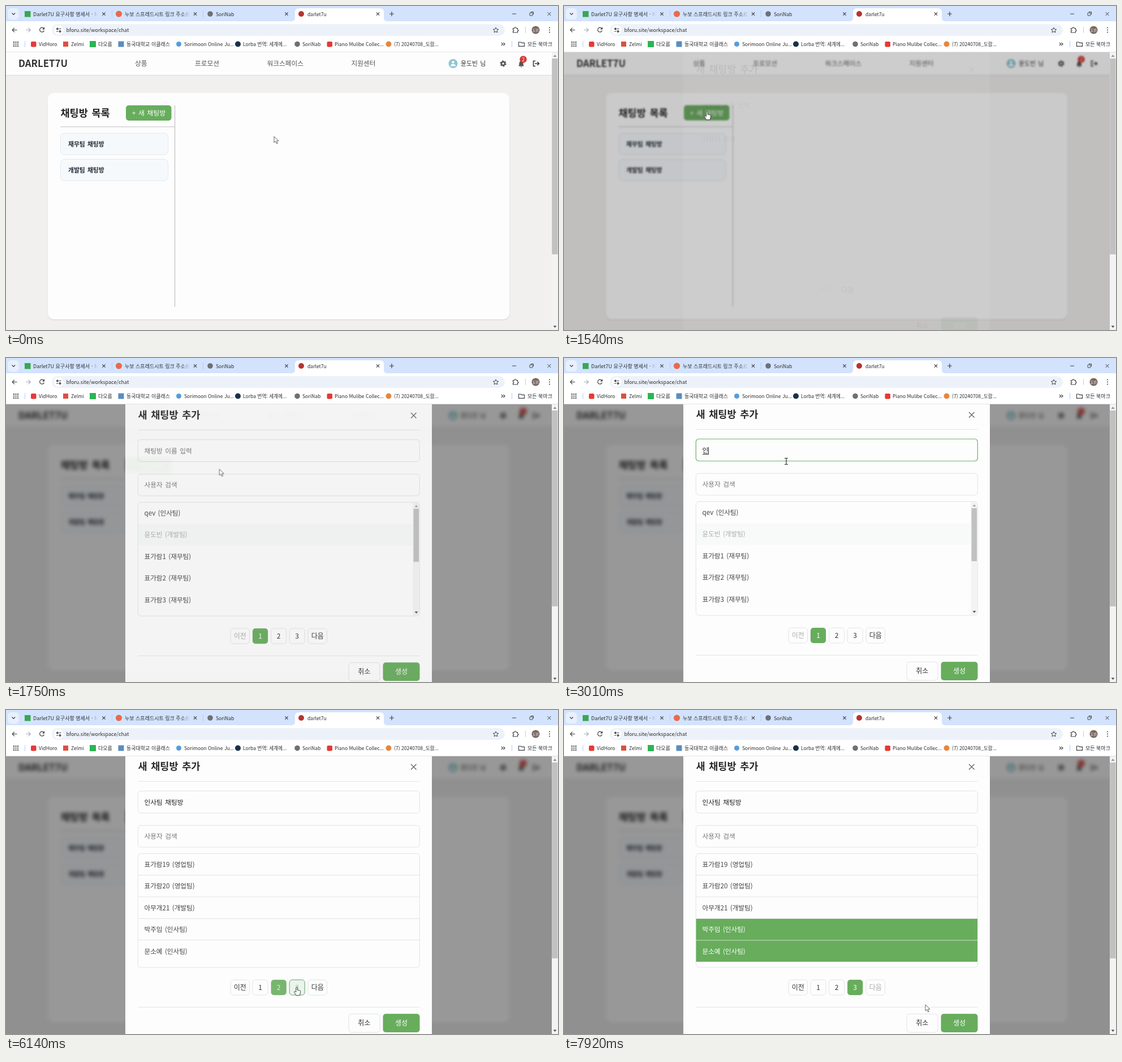
Animation of 976x574 px, one loop 8 s. Source, as an HTML page:

```html
<!DOCTYPE html>
<html lang="ko">
<head>
<meta charset="utf-8">
<title>새 채팅방 추가</title>
<style>
html, body { margin: 0; width: 100%; height: 100%; overflow: hidden; background: #fff; }
svg { display: block; }
text, p { font-family: "Noto Sans CJK KR", "Noto Sans CJK", "Noto Sans", sans-serif; word-spacing: .1em; }
.ui { font-size: 8.6px; fill: #2b2c2f; word-spacing: 0; }
.ui text { word-spacing: 0; }
.ko { font-size: 9px; }
.nav { font-size: 11.7px; fill: #555; }
.user { font-size: 10.9px; fill: #333; }
.b { font-weight: 700; }
.mid { text-anchor: middle; }
.line { fill: none; stroke: #3c4043; stroke-width: 1.2; }
.thin { stroke-width: 1; }
.box { fill: #fdfdfd; stroke: #e1e4e4; }
.green { fill: #67ad5c; }
.w { fill: #fff; }
.hint { fill: #767676; font-size: 11.7px; }
.row text { font-size: 11.6px; fill: #444; }
.row path { stroke: #e1e4e4; }
.row .off, .btn .off { fill: #aaa; }
.btn text { font-size: 12px; fill: #333; text-anchor: middle; }
.btn .w, .sel text { fill: #fff; }
.btn .over { fill: #8fc18a; }

/* one 8 s timeline shared by every moving part */
.t { animation: 8s linear infinite both; }
.blur { animation-name: blur; }
.dim { animation-name: dim; }
.modal { animation-name: modal; }
.hov { animation-name: hov; }
.lift { animation-name: lift; }
.focus { animation-name: focus; }
.empty { animation-name: empty; }
.loaded { animation-name: loaded; }
.l1 { animation-name: l1; } .l2 { animation-name: l2; } .l3 { animation-name: l3; }
.a1 { animation-name: a1; } .a2 { animation-name: a2; } .a3 { animation-name: a3; }
.tint { animation-name: tint; }
.s4 { animation-name: s4; } .s5 { animation-name: s5; }
.cursor { animation-name: path; }
.arrow { animation-name: arrow; } .hand { animation-name: hand; } .beam { animation-name: beam; }

@keyframes blur { 0%, 18.5% { filter: blur(0); } 20%, 100% { filter: blur(3px); } }
@keyframes dim { 0%, 18.5% { opacity: 0; } 20%, 100% { opacity: .4; } }
@keyframes modal {
  0%, 18.9% { opacity: 0; transform: translateY(13px); animation-timing-function: ease; }
  23.5%, 100% { opacity: 1; transform: none; }
}
@keyframes hov { 0%, 15.8% { opacity: 0; } 17%, 18.5% { opacity: .08; } 20%, 100% { opacity: 0; } }
@keyframes lift { 0%, 15.8% { transform: none; } 17%, 18.5% { transform: translateY(-.7px); } 20%, 100% { transform: none; } }
@keyframes focus { 0%, 28.5% { opacity: 0; } 30.25%, 69% { opacity: 1; } 70%, 100% { opacity: 0; } }
@keyframes empty { 0%, 21.1% { opacity: 1; } 21.11%, 100% { opacity: 0; } }
@keyframes loaded { 0%, 21.1% { opacity: 0; } 21.11%, 100% { opacity: 1; } }
@keyframes l1 { 0%, 21.1% { opacity: 0; } 21.11%, 69% { opacity: 1; } 69.01%, 100% { opacity: 0; } }
@keyframes l2 { 0%, 69% { opacity: 0; } 69.01%, 76.5% { opacity: 1; } 76.51%, 100% { opacity: 0; } }
@keyframes l3 { 0%, 76.5% { opacity: 0; } 76.51%, 100% { opacity: 1; } }
@keyframes a1 { 0%, 69% { opacity: 1; } 70.5%, 100% { opacity: 0; } }
@keyframes a2 { 0%, 69% { opacity: 0; } 70.5%, 76.6% { opacity: 1; } 78%, 100% { opacity: 0; } }
@keyframes a3 { 0%, 76.7% { opacity: 0; } 78%, 100% { opacity: 1; } }
@keyframes tint { 0%, 73% { opacity: 0; } 75%, 76.8% { opacity: 1; } 78%, 100% { opacity: 0; } }
@keyframes s4 { 0%, 89.5% { opacity: 0; } 91%, 100% { opacity: 1; } }
@keyframes s5 { 0%, 93.5% { opacity: 0; } 95%, 100% { opacity: 1; } }
@keyframes path {
  0%, 9.99% { transform: translate(474px, 231px); }
  10%, 12.49% { transform: translate(463px, 228px); }
  12.5%, 14.99% { transform: translate(400px, 192px); }
  15% { transform: translate(300px, 186px); }
  17%, 18.6% { transform: translate(248px, 184px); }
  20.125% { transform: translate(259px, 191px); }
  21.875% { transform: translate(377px, 197px); }
  22.75%, 60.2% { transform: translate(393px, 183px); }
  67.5%, 71.6% { transform: translate(482px, 490px); }
  75%, 80% { transform: translate(514px, 491px); }
  83.6%, 86.8% { transform: translate(300px, 352px); }
  87.8%, 91.3% { transform: translate(296px, 383px); }
  92.5%, 95% { transform: translate(298px, 422px); }
  99%, 100% { transform: translate(639px, 522px); }
}
@keyframes arrow {
  0%, 15.6% { opacity: 1; } 15.61%, 21% { opacity: 0; }
  21.01%, 22.5% { opacity: 1; } 22.51%, 95.5% { opacity: 0; }
  95.51%, 100% { opacity: 1; }
}
@keyframes hand {
  0%, 15.6% { opacity: 0; } 15.61%, 19.7% { opacity: 1; } 19.71%, 62% { opacity: 0; }
  62.01%, 95.5% { opacity: 1; } 95.51%, 100% { opacity: 0; }
}
@keyframes beam {
  0%, 19.7% { opacity: 0; } 19.71%, 21% { opacity: 1; } 21.01%, 22.5% { opacity: 0; }
  22.51%, 62% { opacity: 1; } 62.01%, 100% { opacity: 0; }
}

/* typed text: a strip of 40px lines, moved one line per key press */
.strip { animation: type 8s step-end infinite both; }
.strip p { margin: 0; height: 40px; font-size: 11.7px; line-height: 39px; color: #222; white-space: pre; }
.strip .ph { color: #767676; }
.strip u { text-decoration-thickness: 1px; text-underline-offset: 2px; }
.strip s { text-decoration: underline wavy #d8453c .7px; text-underline-offset: 1px; }
.strip i { border-left: 1px solid #222; margin-right: -1px; font-style: normal; font-size: 9px; }
@keyframes type {
  0% { transform: none; }
  28.5% { transform: translateY(-40px); }
  33.5% { transform: translateY(-80px); }
  35.125% { transform: translateY(-120px); }
  37.625% { transform: translateY(-160px); }
  39% { transform: translateY(-200px); }
  40.25% { transform: translateY(-240px); }
  41.5% { transform: translateY(-280px); }
  42.875% { transform: translateY(-320px); }
  44.125% { transform: translateY(-360px); }
  45.25% { transform: translateY(-400px); }
  46.125% { transform: translateY(-440px); }
  47% { transform: translateY(-480px); }
  48.625% { transform: translateY(-520px); }
  51.125% { transform: translateY(-560px); }
  52% { transform: translateY(-600px); }
  55.25% { transform: translateY(-640px); }
  69%, 100% { transform: translateY(-680px); }
}
</style>
</head>
<body>
<svg width="976" height="574" viewBox="0 0 976 574">
<defs>
  <clipPath id="view"><rect y="82" width="965" height="492"/></clipPath>
  <linearGradient id="fade"><stop offset="0" stop-color="#d3e3fd" stop-opacity="0"/><stop offset="1" stop-color="#d3e3fd"/></linearGradient>
  <path id="x" d="M-2.6-2.6 2.6 2.6M2.6-2.6-2.6 2.6"/>
  <path id="dividers" d="M234 292.5H731M234 331H731M234 369.5H731M234 407.5H731M234 446.5H731"/>
  <g id="scroll">
    <rect x="719.5" y="255" width="11.5" height="201" fill="#f3f3f3"/>
    <rect x="720.5" y="266" width="9.5" height="94" fill="#c1c1c1"/>
    <path d="M722.5 263l3-3.5 3 3.5z" fill="#a3a3a3" stroke="none"/>
    <path d="M722.5 448l3 3.5 3-3.5z" fill="#505050" stroke="none"/>
  </g>
  <rect id="num" width="27" height="27" y="478" rx="5"/>
</defs>

<!-- browser frame -->
<rect width="976" height="28" fill="#d3e3fd"/>
<rect y="27" width="976" height="55" fill="#fff"/>
<path d="M505 27q6 0 6-6V11q0-7 7-7H661q7 0 7 7V21q0 6 6 6z" fill="#fff"/>
<rect x="3" y="4" width="20" height="20" rx="6" fill="#e8f0fd"/>
<path class="line" d="M10.5 12.5l2.8 2.8 2.8-2.8"/>
<rect x="33" y="9" width="10.5" height="10.5" fill="#36a852"/>
<circle cx="199.5" cy="14" r="5.6" fill="#ea6a4b"/>
<circle cx="361" cy="14" r="4.8" fill="#6d7075"/>
<circle cx="522" cy="14" r="5" fill="#b8322f"/>
<g class="ui">
  <text class="ko" x="48" y="17.5">Darlet7U 요구사항 명세서 - N</text>
  <text class="ko" x="210" y="17.5">누보 스프레드시트 링크 주소르</text>
  <text x="371" y="17.5">SoriNab</text>
  <text x="533" y="17.5">darlet7u</text>
</g>
<rect x="148" y="5" width="14" height="18" fill="url(#fade)"/><rect x="162" y="5" width="6" height="18" fill="#d3e3fd"/>
<rect x="311" y="5" width="14" height="18" fill="url(#fade)"/><rect x="325" y="5" width="5" height="18" fill="#d3e3fd"/>
<g class="line">
  <use href="#x" x="173" y="14"/><use href="#x" x="334.5" y="14"/><use href="#x" x="496" y="14"/><use href="#x" x="657.5" y="14"/>
  <path d="M678 14h8M682 10v8"/>
  <path class="thin" d="M895 14h7M957.5 11l6 6M963.5 11l-6 6M928 10.5h4.5V15"/>
  <rect class="thin" x="926" y="12" width="5" height="5" rx="1"/>
</g>
<path d="M187.5 8v12M348.5 8v12M918.5 37v11M33.5 62v11M894.5 62v11" stroke="#b3cdf5"/>
<rect x="81" y="32" width="801" height="21" rx="10.5" fill="#edf2fa"/>
<circle cx="93" cy="42.5" r="8.5" fill="#fff"/>
<g class="line">
  <path d="M19.5 42.5h-8M15 38.7l-3.8 3.8 3.8 3.8"/>
  <path d="M35 42.5h8M39.5 38.7l3.8 3.8-3.8 3.8" stroke="#a9acb0"/>
  <path d="M67 40a4 4 0 1 0 .4 3.5M67.5 37.8V40.8H64.5"/>
  <path d="M89 40.5h2.5M94 40.5h3.5M89 45h3.5M95 45h2.5"/><circle cx="91" cy="40.5" r="1.3"/><circle cx="95.5" cy="45" r="1.3"/>
  <path class="thin" d="M866 38l1.4 3 3.3.4-2.4 2.2.6 3.3-2.9-1.6-2.9 1.6.6-3.3-2.4-2.2 3.3-.4z"/>
  <path d="M896.5 39.5H899q0-2 1.5-2t1.5 2H904.5V42q1.5 0 1.5 1.3T904.5 44.6V47H896.5V44.5q1.5-.2 1.5-1.3T896.5 42z"/>
  <path d="M906.5 64h4l1 1.3h5v6h-10z"/>
  <path d="M876 65l2.5 2.5-2.5 2.5M879.5 65l2.5 2.5-2.5 2.5"/>
</g>
<circle cx="936.5" cy="42.5" r="7" fill="#796a62"/>
<text x="936.5" y="44.7" class="mid w" font-size="6">도빈</text>
<g fill="#3c4043"><circle cx="961" cy="38.5" r="1"/><circle cx="961" cy="42.5" r="1"/><circle cx="961" cy="46.5" r="1"/></g>
<text x="106.5" y="46" font-size="9" fill="#2b2c2f">bforu.site/workspace/chat</text>
<path d="M13 64h9M13 67.5h9M13 71h9" stroke="#3c4043" stroke-width="2" stroke-dasharray="2 1.5"/>
<rect x="44" y="63" width="9.5" height="9.5" rx="2" fill="#e33a36"/>
<rect x="101" y="63" width="9" height="9" fill="#d8523f"/>
<rect x="148" y="62" width="11" height="11" fill="#2eb354"/>
<rect x="198.5" y="62.5" width="10" height="10" fill="#5b8cc0"/>
<circle cx="305.5" cy="67.5" r="4.5" fill="#5a9bd8"/>
<circle cx="410" cy="67.5" r="5" fill="#18304d"/>
<circle cx="515" cy="67.5" r="4.8" fill="#6d7075"/>
<rect x="567.5" y="63" width="9.5" height="9.5" rx="2" fill="#e33a36"/>
<circle cx="676.5" cy="67.5" r="5" fill="#e7873f"/>
<g class="ui">
  <text x="58" y="70.5">VidHoro</text><text x="115" y="70.5">Zelmi</text>
  <text class="ko" x="163" y="71">다오름</text><text class="ko" x="213" y="71">동국대학교 이클래스</text>
  <text x="315" y="70.5">Sorimoon Online Ju...</text><text x="419" y="70.5">Lorba 번역: 세계에...</text>
  <text x="524" y="70.5">SoriNab</text><text x="581" y="70.5">Piano Mulibe Collec...</text>
  <text x="686" y="70.5">(7) 20240708_도람...</text><text class="ko" x="922" y="71">모든 북마크</text>
</g>
<path d="M0 81.5H976" stroke="#dfe3e8"/>

<!-- page -->
<g clip-path="url(#view)">
  <rect y="82" width="965" height="492" fill="#f1f0ef"/>
  <g class="t blur">
    <rect x="-20" y="60" width="1010" height="540" fill="#f1f0ef"/>
    <rect x="-20" y="60" width="1010" height="63.5" fill="#e3e2e1"/>
    <rect x="-20" y="60" width="1010" height="62" fill="#fdfdfd"/>
    <text class="b" x="22" y="108.3" font-size="16.8" fill="#333">DARLET7U</text>
    <g class="nav">
      <text x="228" y="106.3">상품</text><text x="334" y="106.3">프로모션</text>
      <text x="461.5" y="106.3">워크스페이스</text><text x="610.5" y="106.3">지원센터</text>
    </g>
    <text class="user" x="804" y="105.8">윤도빈 님</text>
    <circle cx="790.5" cy="102" r="8" fill="#8ec6d0"/>
    <circle cx="790.5" cy="99.5" r="2.3" fill="#fff"/><path d="M786 106.5q0-3.8 4.5-3.8t4.5 3.8z" fill="#fff"/>
    <circle cx="879" cy="102" r="3.1" fill="none" stroke="#555" stroke-width="2.6"/>
    <circle cx="879" cy="102" r="4.8" fill="none" stroke="#555" stroke-width="1.6" stroke-dasharray="2.5 2.53"/>
    <path d="M906 106.5q1.5-1.5 1.5-5 0-3.5 3.5-3.8 3.5.3 3.5 3.8 0 3.5 1.5 5zM909.5 107.2h3q-.3 1.3-1.5 1.3t-1.5-1.3z" fill="#555"/>
    <circle cx="914.5" cy="94.5" r="6.2" fill="#d23b35"/><text class="mid w" x="914.5" y="97.7" font-size="8.5">2</text>
    <path d="M936 97.5h-3.5v9h3.5M935 102h7M939.5 99l3 3-3 3" fill="none" stroke="#333" stroke-width="1.5"/>
    <rect x="73.5" y="155" width="817" height="402" rx="11" fill="#e3e2e1"/>
    <rect x="74" y="154" width="816" height="401" rx="11" fill="#fdfdfd"/>
    <path d="M298.5 176V533M96 214H298" stroke="#c0c0c0" stroke-width="1.2"/>
    <text class="b" x="96.5" y="195.7" font-size="17.5" fill="#222">채팅방 목록</text>
    <g class="t lift">
      <rect class="green" x="212" y="176" width="80.5" height="27" rx="5"/>
      <rect class="t hov" x="212" y="176" width="80.5" height="27" rx="5"/>
      <text class="mid w" x="252.5" y="194" font-size="11.9">+ 새 채팅방</text>
    </g>
    <g fill="#f6f9fc" stroke="#e0e9f0">
      <rect x="96.5" y="225.5" width="190" height="38" rx="7"/><rect x="96.5" y="271.5" width="190" height="38" rx="7"/>
    </g>
    <g class="b" font-size="10.8" fill="#1f2a36"><text x="110" y="248.8">재무팀 채팅방</text><text x="110" y="294.8">개발팀 채팅방</text></g>
  </g>
  <rect class="t dim" y="82" width="965" height="492"/>

  <!-- dialog -->
  <g class="t modal">
    <rect x="211" y="50" width="542" height="560" fill="#fdfdfd"/>
    <text class="b" x="233.5" y="106.3" font-size="17.5" fill="#2a2a2a">새 채팅방 추가</text>
    <path d="M716 96l9.5 9.5M725.5 96l-9.5 9.5" stroke="#555" stroke-width="1.2"/>
    <path d="M233 126.5H731.5M233 526.5H731.5" stroke="#e4e6e6"/>
    <g class="box">
      <rect x="233.3" y="143.5" width="498" height="39" rx="5"/>
      <rect x="233.3" y="204.5" width="498" height="38.5" rx="5"/>
      <rect x="233.3" y="254.5" width="498" height="201.5" rx="5"/>
    </g>
    <rect class="t focus" x="233.3" y="143.5" width="498" height="39" rx="5" fill="none" stroke="#74b46c" stroke-width="1.2"/>
    <foreignObject x="244.5" y="143" width="470" height="40">
      <div class="strip">
        <p class="ph">채팅방 이름 입력</p>
        <p class="ph"><i>&#8203;</i>채팅방 이름 입력</p>
        <p><u>ㅇ</u><i>&#8203;</i></p>
        <p><u>이</u><i>&#8203;</i></p>
        <p><u>인</u><i>&#8203;</i></p>
        <p>인<u>ㅅ</u><i>&#8203;</i></p>
        <p>인<u>사</u><i>&#8203;</i></p>
        <p>인사<u>ㅌ</u><i>&#8203;</i></p>
        <p>인사<u>티</u><i>&#8203;</i></p>
        <p>인사<u>팀</u><i>&#8203;</i></p>
        <p>인사팀 <i>&#8203;</i></p>
        <p>인사팀 <u>ㅊ</u><i>&#8203;</i></p>
        <p>인사팀 <u>채</u><i>&#8203;</i></p>
        <p>인사팀 채<u>티</u><i>&#8203;</i></p>
        <p>인사팀 채<u>팅</u><i>&#8203;</i></p>
        <p>인사팀 채팅<u>바</u><i>&#8203;</i></p>
        <p><s>인사팀</s> 채팅<u>방</u><i>&#8203;</i></p>
        <p>인사팀 채팅방</p>
      </div>
    </foreignObject>
    <text class="hint" x="244.5" y="228.3">사용자 검색</text>

    <g class="row t l1">
      <rect x="234" y="293" width="486" height="38" fill="#f8faf9"/>
      <use href="#dividers"/><use href="#scroll"/>
      <text x="244.5" y="278">qev (인사팀)</text>
      <text x="244.5" y="316.4" class="off">윤도빈 (개발팀)</text>
      <text x="244.5" y="354.8">표가람1 (재무팀)</text>
      <text x="244.5" y="393.2">표가람2 (재무팀)</text>
      <text x="244.5" y="431.6">표가람3 (재무팀)</text>
    </g>
    <g class="row t l2">
      <use href="#dividers"/><use href="#scroll"/>
      <text x="244.5" y="278">표가람9 (재무팀)</text>
      <text x="244.5" y="316.4">표가람10 (재무팀)</text>
      <text x="244.5" y="354.8">표가람11 (영업팀)</text>
      <text x="244.5" y="393.2">표가람12 (영업팀)</text>
      <text x="244.5" y="431.6">표가람13 (영업팀)</text>
    </g>
    <g class="row t l3">
      <path d="M234 292.5H731M234 331H731M234 369.5H731M234 407.5H731"/>
      <text x="244.5" y="278">표가람19 (영업팀)</text>
      <text x="244.5" y="316.4">표가람20 (영업팀)</text>
      <text x="244.5" y="354.8">아무개21 (개발팀)</text>
      <text x="244.5" y="393.2">박주임 (인사팀)</text>
      <text x="244.5" y="431.6">문소예 (인사팀)</text>
    </g>
    <g class="row sel">
      <g class="t s4"><rect class="green" x="233.5" y="370" width="497.5" height="37.5"/><text x="244.5" y="393.2">박주임 (인사팀)</text></g>
      <g class="t s5"><rect class="green" x="233.5" y="408.3" width="497.5" height="37.7"/><text x="244.5" y="431.6">문소예 (인사팀)</text></g>
    </g>

    <g class="btn t empty">
      <rect class="box" x="446" y="478" width="33.5" height="27" rx="5"/><text class="off" x="462.8" y="496">이전</text>
      <rect class="box" x="485" y="478" width="33.5" height="27" rx="5"/><text x="501.8" y="496">다음</text>
    </g>
    <g class="btn t loaded">
      <g class="box">
        <rect x="397" y="478" width="33.5" height="27" rx="5"/><rect x="534" y="478" width="33.5" height="27" rx="5"/>
        <use href="#num" x="436"/><use href="#num" x="468.7"/><use href="#num" x="501.2"/>
      </g>
      <text x="413.8" y="496">이전</text><text x="550.8" y="496">다음</text>
      <text x="449.5" y="496">1</text><text x="482.2" y="496">2</text><text x="514.7" y="496">3</text>
      <g class="t a1">
        <rect x="401" y="481" width="26" height="21" fill="#fdfdfd"/><text class="off" x="413.8" y="496">이전</text>
        <use href="#num" x="436" class="green"/><text class="w" x="449.5" y="496">1</text>
      </g>
      <g class="t a2"><use href="#num" x="468.7" class="green"/><text class="w" x="482.2" y="496">2</text></g>
      <g class="t tint"><use href="#num" x="501.2" fill="#f0f8f2" stroke="#67a576"/><text class="over" x="514.7" y="496">3</text></g>
      <g class="t a3">
        <rect x="538" y="481" width="26" height="21" fill="#fdfdfd"/><text class="off" x="550.8" y="496">다음</text>
        <use href="#num" x="501.2" class="green"/><text class="w" x="514.7" y="496">3</text>
      </g>
    </g>
    <g class="btn">
      <rect class="box" x="606" y="538.5" width="55" height="32.5" rx="5"/><text x="633.3" y="559">취소</text>
      <rect class="green" x="666.5" y="538.3" width="65" height="32.7" rx="5"/><text class="w" x="699" y="559">생성</text>
    </g>
  </g>
</g>

<!-- page scrollbar -->
<rect x="965" y="82" width="11" height="492" fill="#f3f3f3"/>
<rect x="965.2" y="93" width="10.2" height="347" fill="#c1c1c1"/>
<path d="M967.5 90l3-3.5 3 3.5z" fill="#8a8a8a"/><path d="M967.5 566.5l3 3.5 3-3.5z" fill="#505050"/>

<g class="t cursor">
  <path class="t arrow" d="M0 0V11l2.6-2.3 1.9 4.2 1.8-.8-1.9-4.1H8z" fill="#fff" stroke="#555" stroke-width=".9"/>
  <path class="t hand" d="M-1.2 1q0-1.4 1.2-1.4T1.2 1V5l4 .9q1.6.5 1.5 2.1l-.7 4-.8 2.5H-1L-4 9.5q-1-1.3 0-1.9t2.8 1.2z" fill="#fff" stroke="#333" stroke-width=".9"/>
  <path class="t beam" d="M-3-5.5h2L0-5l1-.5h2M0-5V5M-3 5.5h2L0 5l1 .5h2" fill="none" stroke="#222" stroke-width="1.1"/>
</g>
</svg>
</body>
</html>
```
